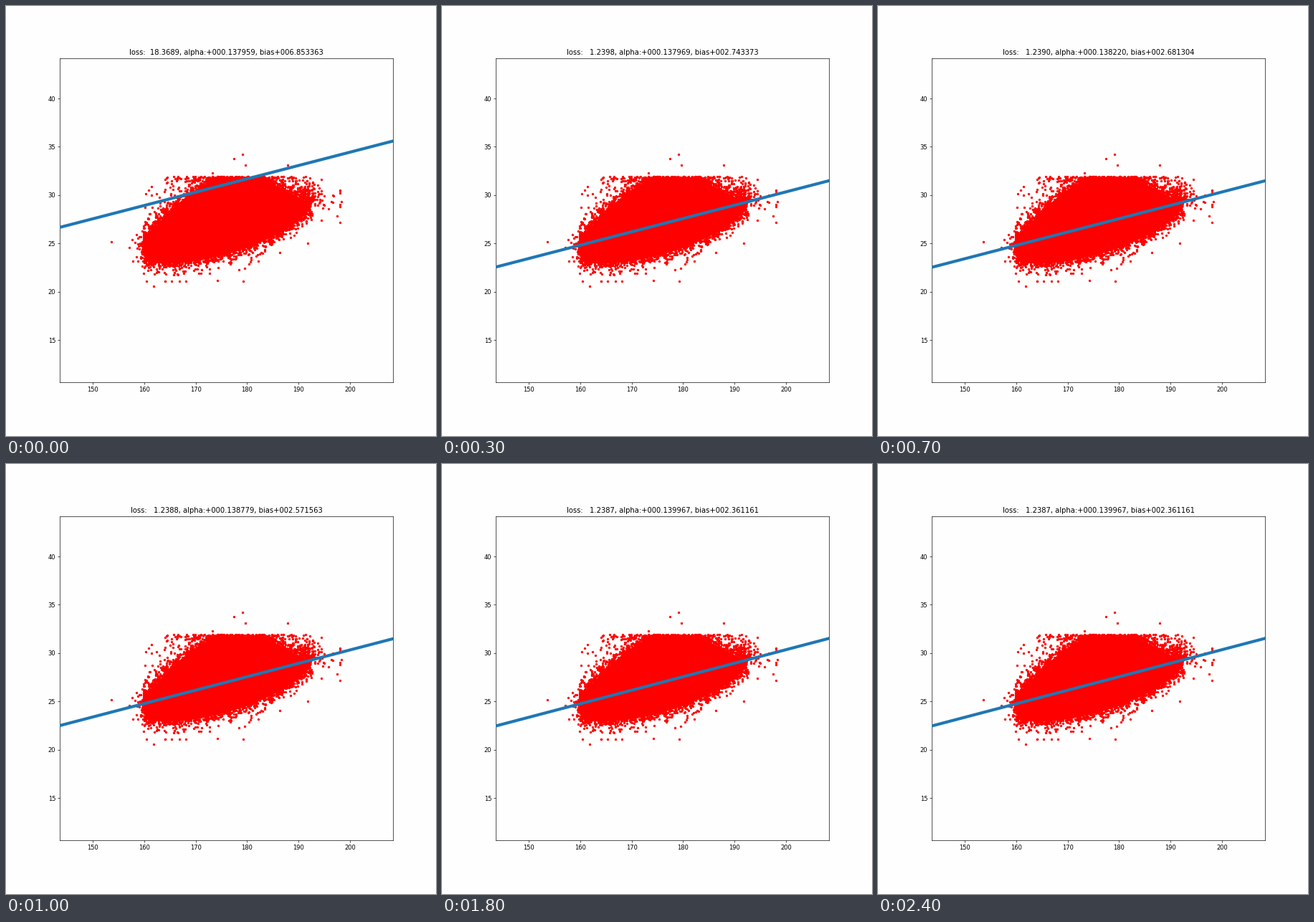
Recreate the animation shown at these times as a matplotlib script. Size 600 by 600 pixels, loop 2500 ms.

```python
import numpy as np
import matplotlib.pyplot as plt
from matplotlib.animation import FuncAnimation

FRAMES, INTERVAL = 25, 100
XLIM, YLIM = (143.59, 208.36), (10.63, 44.19)
PAPER = "#fefefe"
CEILING = 31.93
MEAN_X, STD_X = 175.975, 6.5
BEST_LOSS = 1.2387

# Fit at a few key steps; the last one is the optimum
STEPS = [0, 3, 5, 10, 14, 18]
ALPHAS = [0.137959, 0.137969, 0.137847, 0.138779, 0.138959, 0.139967]
BIASES = [6.853363, 2.743373, 2.754465, 2.571563, 2.541864, 2.361161]

rng = np.random.default_rng(7)


def fit(k):
    """Slope, intercept and loss; the first steps close in geometrically."""
    if k < STEPS[1]:
        k = STEPS[1] * (1 - 0.2 ** k) / (1 - 0.2 ** STEPS[1])
    alpha = np.interp(k, STEPS, ALPHAS)
    bias = np.interp(k, STEPS, BIASES)
    d_alpha, d_bias = alpha - ALPHAS[-1], bias - BIASES[-1]
    offset = d_alpha * MEAN_X + d_bias
    return alpha, bias, BEST_LOSS + offset ** 2 + (d_alpha * STD_X) ** 2


def edges(x):
    """Lower and upper edge of the dense part of the cloud."""
    mid = ALPHAS[-1] * x + BIASES[-1]
    bulge = np.clip(1 - ((x - 175) / 17.8) ** 2, 0, 1)
    return mid - 3.1 * bulge ** 0.55, mid + 5.0 * bulge ** 1.4


def overshoot(n, near, far, share):
    """Mostly short distances, with a share of long ones."""
    return rng.exponential(np.where(rng.random(n) < share, far, near))


def make_cloud():
    x_low, x_up = rng.uniform(159.8, 192.5, 430), rng.uniform(159.8, 193, 850)
    low = edges(x_low)[0] - overshoot(430, 0.3, 0.9, 0.2)
    up = edges(x_up)[1] + overshoot(850, 0.35, 1.9, 0.45)
    x_left = 160.2 - rng.exponential(0.6, 100)
    x_right = 191 + np.minimum(rng.exponential(2.2, 110), 7)
    x = np.concatenate([x_low, x_up, x_left, x_right])
    y = np.concatenate([low, up, rng.normal(24.5, 0.9, 100),
                        rng.normal(29.5, 1.0, 110)])
    # Values past the ceiling gather just beneath it
    y = np.where(y > CEILING, CEILING - rng.uniform(0, 0.5, len(y)), y)
    return x, np.maximum(y, 21.1)


fig = plt.figure(figsize=(10, 10), dpi=60, facecolor=PAPER)
fig.subplots_adjust(left=0.125, right=0.9, bottom=0.125, top=0.879)
ax = fig.add_subplot(facecolor=PAPER)

x_core = np.linspace(160, 192.5, 100)
low, up = edges(x_core)
ax.fill_between(x_core, low, np.minimum(up, CEILING), color="red", lw=0, zorder=1)
ax.plot(*make_cloud(), "r.", zorder=2)
ax.plot([153.6, 161.8, 173.3, 177.5, 179.05, 179.6, 187.9, 198.4],
        [25.2, 20.6, 32.3, 33.8, 34.2, 33.1, 33.1, 29.3], "r.", zorder=2)
line, = ax.plot([], [], color="#1f77b4", lw=5, zorder=3)
ax.set(xlim=XLIM, ylim=YLIM,
       xticks=range(150, 201, 10), yticks=range(15, 41, 5))
title = ax.set_title("")
x_line = np.array([XLIM[0] - 5, XLIM[1] + 5])


def update(k):
    alpha, bias, loss = fit(k)
    line.set_data(x_line, alpha * x_line + bias)
    title.set_text(f"loss: {loss:8.4f}, alpha:{alpha:+011.6f}, bias{bias:+011.6f}")
    return line, title


anim = FuncAnimation(fig, update, frames=FRAMES, interval=INTERVAL,
                     init_func=lambda: update(0), repeat=True, repeat_delay=0)
plt.show()
```
